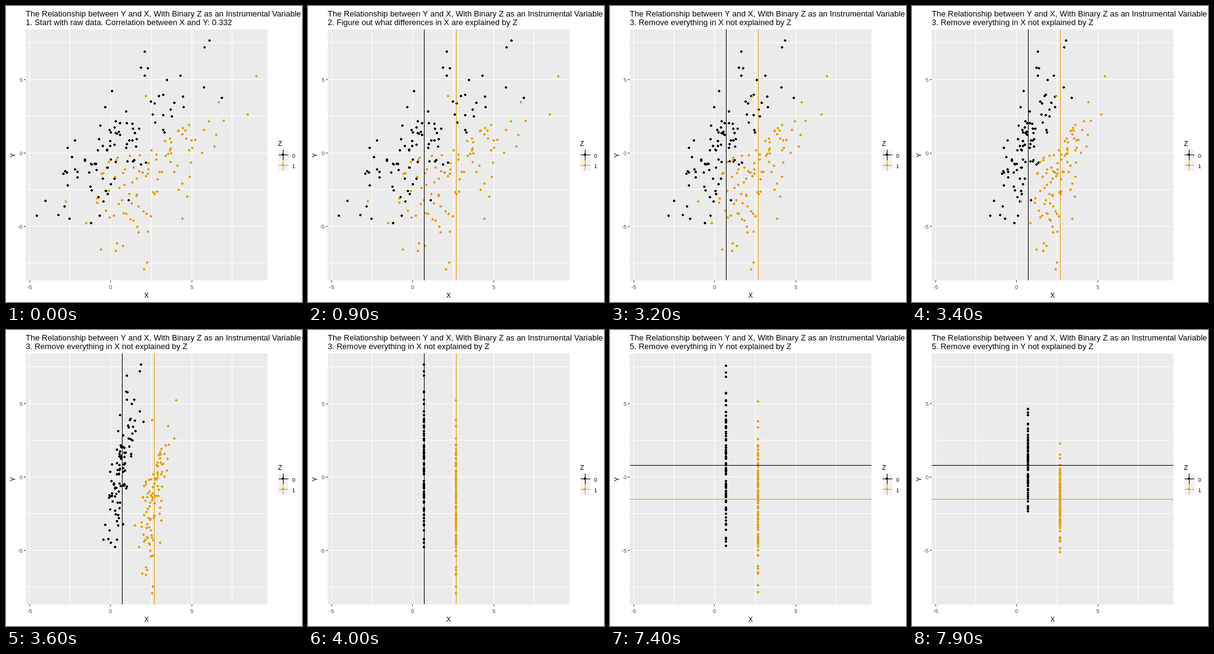
Recreate the animation shown at these times as an HTML page with a canvas. Size 480x480 px, loop 8000 ms.

```html
<!DOCTYPE html>
<html lang="en">
<head>
<meta charset="utf-8">
<title>Instrumental variable</title>
<style>
  html, body { margin: 0; width: 100%; height: 100%; overflow: hidden; background: #fff; }
  canvas { display: block; }
</style>
</head>
<body>
<canvas id="plot" width="480" height="480"></canvas>
<script>
const ctx = document.getElementById('plot').getContext('2d');
const LOOP = 8000, STEP = 100, STEPS = 13, POINTS = 100;
const left = 32, top_ = 38, width = 392, height = 407, bottom = top_ + height;
const HEADING = 'The Relationship between Y and X, With Binary Z as an Instrumental Variable';
const captions = [
  [7400, '5. Remove everything in Y not explained by Z'],
  [5100, '4. Figure out what differences in Y are explained by Z'],
  [2800, '3. Remove everything in X not explained by Z'],
  [500, '2. Figure out what differences in X are explained by Z'],
  [0, '1. Start with raw data. Correlation between X and Y: 0.332']
];

let seed = 2024;
function random() {
  seed = (seed * 16807) % 2147483647;
  return seed / 2147483647;
}
const bell = () => (random() + random() + random() - 1.5) * 2;

// A correlated cloud around the mean, completed by its extreme points.
function makeGroup(color, meanX, meanY, spreadX, slope, spreadY, extremes) {
  const points = [...extremes];
  while (points.length < POINTS) {
    const dx = bell() * spreadX;
    points.push([meanX + dx, meanY + slope * dx + bell() * spreadY]);
  }
  return { color, meanX, meanY, points };
}

const groups = [
  makeGroup('#000', 188, 219, 42, -0.7, 39, [
    [330, 56], [322, 67], [225, 74], [219, 100], [230, 101], [225, 113],
    [321, 132], [350, 149], [50, 340], [64, 316], [85, 339], [138, 352]
  ]),
  makeGroup('#E69F00', 240, 274, 46, -0.5, 42, [
    [406, 114], [392, 176], [345, 156], [353, 186], [227, 146], [97, 317],
    [154, 395], [180, 385], [190, 389], [230, 366], [229, 416], [224, 427]
  ])
];

function rect(x, y, w, h, color) {
  ctx.fillStyle = color;
  ctx.fillRect(x, y, w, h);
}

function text(string, x, y, size, align = 'left', color = '#000') {
  ctx.font = `${size}px "Liberation Sans", Arial, sans-serif`;
  ctx.textAlign = align;
  ctx.fillStyle = color;
  ctx.fillText(string, x, y);
}

function dot(x, y, color) {
  x = Math.round(x);
  y = Math.round(y);
  rect(x - 1, y - 2, 2, 4, color);
  rect(x - 2, y - 1, 4, 2, color);
}

function drawAxes() {
  rect(left, top_, width, height, '#EBEBEB');
  for (let i = 0; i < 6; i++) {
    const x = Math.floor(38.1 + 65.75 * i);
    rect(x, top_, 1, height, '#fff');
    if (i % 2 === 0) {
      rect(x, bottom, 1, 3, '#333');
      text(String(i * 2.5 - 5), x + 0.5, 459, 9, 'center', '#4D4D4D');
    }
  }
  for (let i = 0; i < 7; i++) {
    const y = Math.floor(59.7 + 59.5 * i);
    rect(left, y, width, 1, '#fff');
    if (i % 2) {
      rect(left - 3, y, 3, 1, '#333');
      text(String(7.5 - i * 2.5), 27, y + 4, 9, 'right', '#4D4D4D');
    }
  }
  text('X', 228, 473, 11, 'center');
  ctx.save();
  ctx.translate(15, 242);
  ctx.rotate(-Math.PI / 2);
  text('Y', 0, 0, 11, 'center');
  ctx.restore();
}

function drawLegend() {
  text('Z', 441, 227, 11);
  groups.forEach(({ color }, i) => {
    const y = 233 + 17 * i;
    rect(442, y, 16, 17, '#F2F2F2');
    dot(449, y + 8, color);
    rect(449, y, 1, 17, color);
    rect(442, y + 8, 16, 1, color);
    text(String(i), 464, y + 13, 9);
  });
}

// Remaining share of the distance to the mean: sine in-out in equal steps.
function remaining(time, start) {
  const step = Math.floor((time - start) / STEP) + 1;
  const progress = Math.min(1, Math.max(0, step / STEPS));
  return (1 + Math.cos(Math.PI * progress)) / 2;
}

function draw(time) {
  rect(0, 0, 480, 480, '#fff');
  text(HEADING, 32, 17, 13);
  text(captions.find(([start]) => time >= start)[1], 32, 31, 13);
  drawAxes();

  const scaleX = remaining(time, 2800);
  const scaleY = remaining(time, 7400);
  for (const { color, meanX, meanY, points } of groups) {
    for (const [x, y] of points) {
      dot(meanX + (x - meanX) * scaleX, meanY + (y - meanY) * scaleY, color);
    }
  }
  for (const { color, meanX, meanY } of groups) {
    if (time >= 900 && time < 5100) rect(meanX, top_, 1, height, color);
    if (time >= 5500) rect(left, meanY, width, 1, color);
  }
  drawLegend();
}

const begin = performance.now();
function tick() {
  draw((performance.now() - begin) % LOOP);
  requestAnimationFrame(tick);
}
tick();
</script>
</body>
</html>
```
